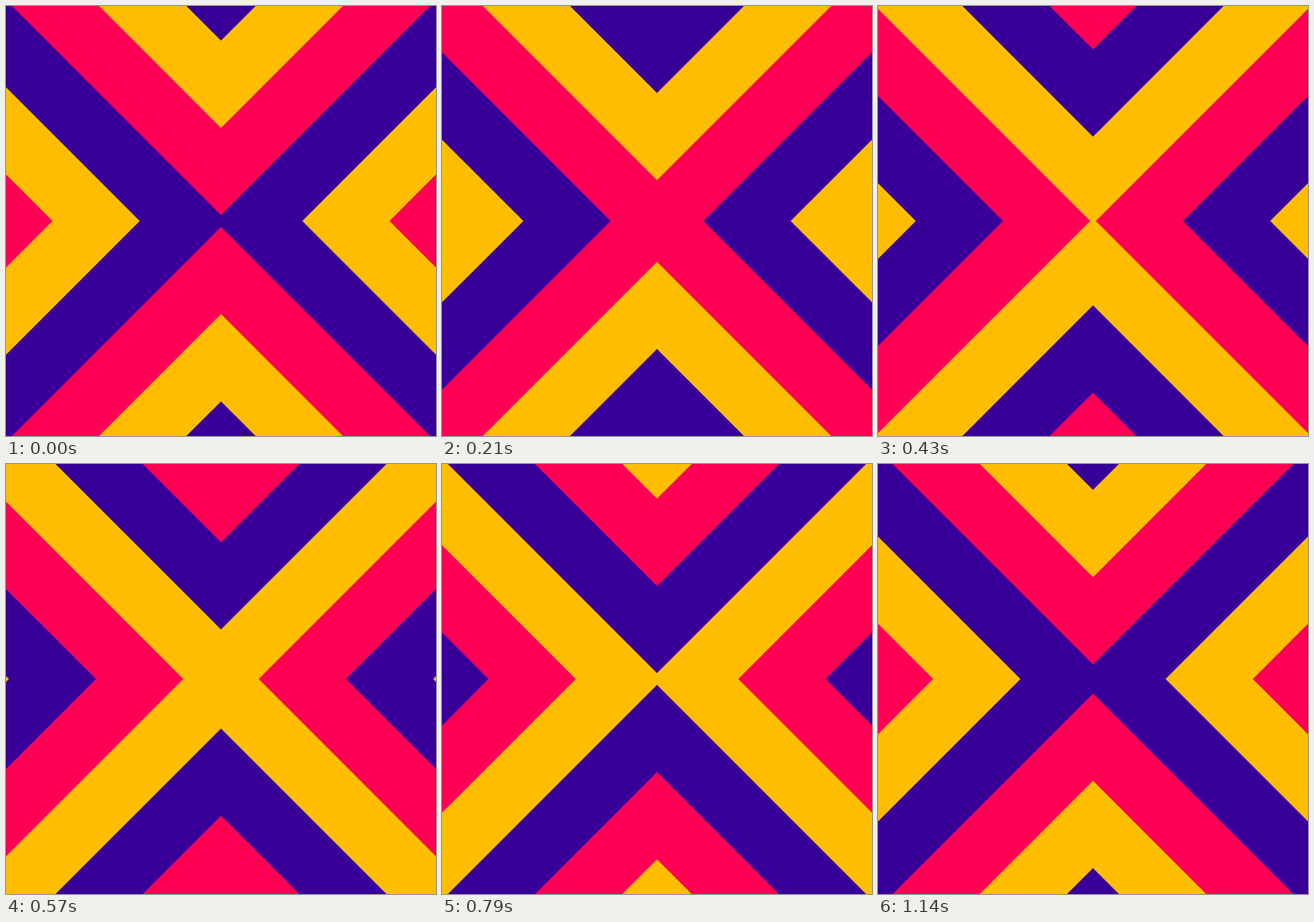
Recreate the animation shown at these times as an HTML page with a canvas. Size 640 by 640 pixels, loop 1210 ms.

```html
<!DOCTYPE html>
<html lang="en">
<head>
<meta charset="utf-8">
<title>Chevron cross</title>
<style>
  html, body { margin: 0; width: 100%; height: 100%; overflow: hidden; background: #390099; }
  canvas { display: block; width: 640px; height: 640px; }
</style>
</head>
<body>
<canvas id="stage" width="640" height="640"></canvas>
<script>
const ctx = document.getElementById('stage').getContext('2d');
const COLORS = ['#390099', '#FFBD00', '#FF0054'];
const LOOP = 1210;       // ms
const MID = 320;
const BAND = 129.8;      // band width along either axis
const STEP = BAND / 5 / 2;
const START = -8.8;      // first band edge at time zero
const RATE = 14;         // pictures per second shown
const BASE = 25;         // motion steps per second

const color = n => COLORS[((n % 3) + 3) % 3];

// Pictures change on 10 ms ticks.
const frameStart = k => Math.round(k * 100 / RATE) * 10;

function stepAt(t) {
  let k = 0;
  while (k < 16 && frameStart(k + 1) <= t) k++;
  return Math.ceil((k + 0.5) * BASE / RATE) - 1;
}

// Right-angled wedge with its tip at distance d from the centre, opening along (dx, dy).
function wedge(d, dx, dy) {
  const x = MID + dx * d, y = MID + dy * d, r = 2 * MID;
  ctx.beginPath();
  ctx.moveTo(x, y);
  ctx.lineTo(x + (dx + dy) * r, y + (dy - dx) * r);
  ctx.lineTo(x + (dx - dy) * r, y + (dy + dx) * r);
  ctx.fill();
}

function draw(t) {
  const offset = START + stepAt(t) * STEP;
  const edge = n => offset + n * BAND;
  const center = Math.floor(-offset / BAND);

  ctx.fillStyle = color(center);
  ctx.fillRect(0, 0, 640, 640);

  for (let n = center + 1; edge(n) < MID; n++) {
    ctx.fillStyle = color(n);
    wedge(edge(n), 1, 0);
    wedge(edge(n), -1, 0);
  }
  for (let n = center; edge(n) > -MID; n--) {
    ctx.fillStyle = color(n - 1);
    wedge(-edge(n), 0, 1);
    wedge(-edge(n), 0, -1);
  }
}

const begin = performance.now();
function tick() {
  draw((performance.now() - begin) % LOOP);
  requestAnimationFrame(tick);
}
tick();
</script>
</body>
</html>
```
